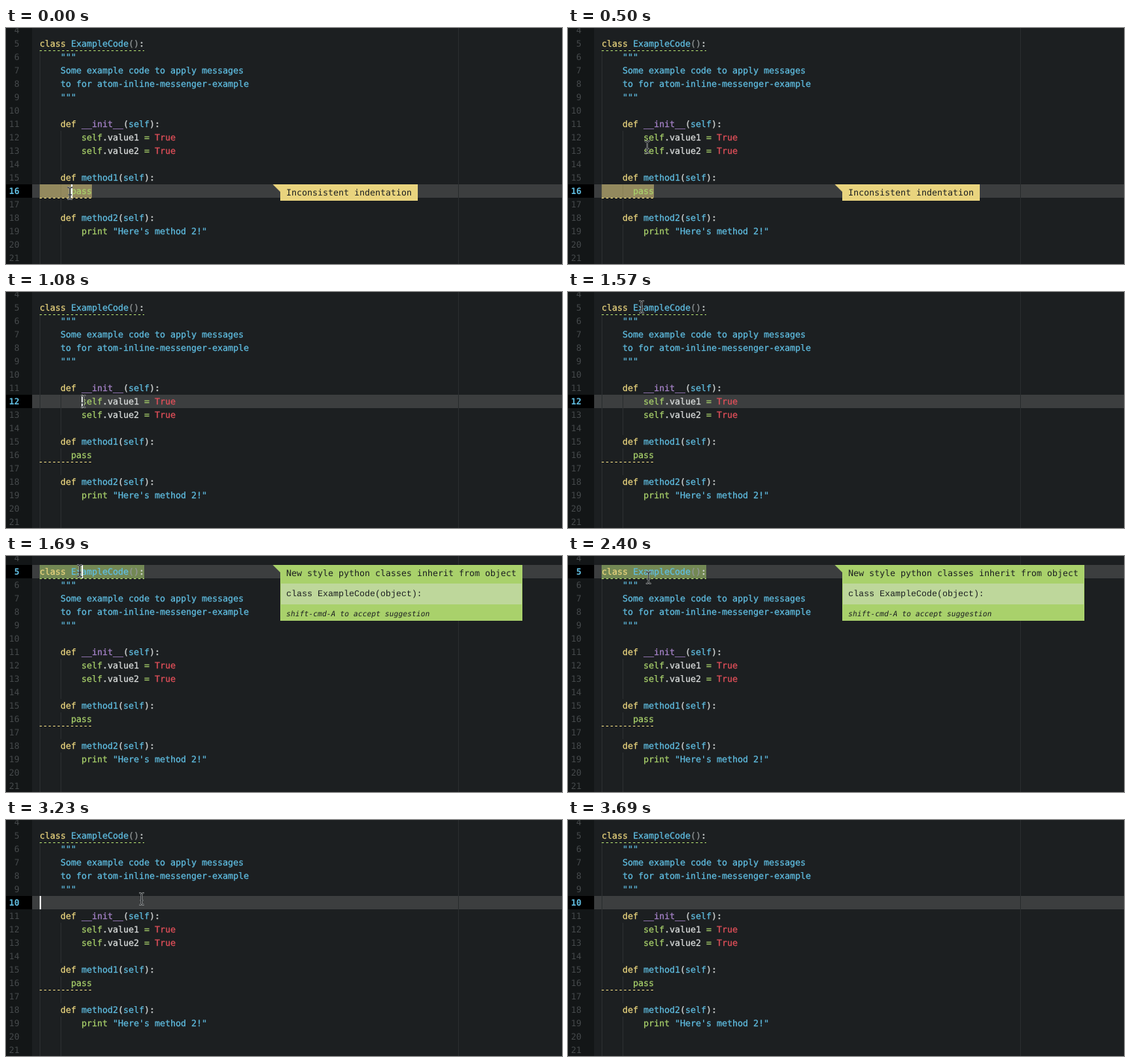
These frames come from a looping animation (744x317 px, 4250 ms). An HTML page:

```html
<!DOCTYPE html>
<html lang="en">
<head>
<meta charset="utf-8">
<title>Inline messages</title>
<style>
  html, body { margin: 0; width: 100%; height: 100%; overflow: hidden; background: #1c1f21; }
  svg { display: block; }
  text {
    font: 11.63px "DejaVu Sans Mono", monospace;
    white-space: pre;
    text-rendering: geometricPrecision;
  }
  .code { stroke-width: .25px; }
  .num { fill: #45494b; text-anchor: end; }
  .num.on { fill: #62c0e4; font-weight: bold; }
  .sample { font: 11.67px "Liberation Mono", monospace; }
  .hint { font: italic 9.97px "DejaVu Sans Mono", monospace; }
  .dash { stroke-dasharray: 3 3; }
</style>
</head>
<body>
<svg id="stage" width="744" height="317" viewBox="0 0 744 317"></svg>
<script>
const LOOP = 4250, LEFT = 45, CHAR = 7, LINE = 18;
const YELLOW = '#e9d47e', BLUE = '#60bfe3', GREEN = '#a9d16b', RED = '#e2505a',
      PURPLE = '#a884cb', WHITE = '#dcdfde', GREY = '#939899', INK = '#1c1f21';
const stage = document.getElementById('stage');
const rowTop = n => 12 + (n - 5) * LINE;

function add(tag, attrs, parent = stage, content = '') {
  const el = document.createElementNS('http://www.w3.org/2000/svg', tag);
  for (const key in attrs) el.setAttribute(key, attrs[key]);
  el.textContent = content;
  parent.append(el);
  return el;
}
const rect = (x, y, width, height, fill, parent) => add('rect', { x, y, width, height, fill }, parent);
const show = (el, on) => el.setAttribute('visibility', on ? 'visible' : 'hidden');

// Background, active row and guides
rect(0, 0, 744, 317, '#1c1f21');
rect(0, 0, 35, 317, '#131617');
const active = add('g', {});
rect(0, 0, 35, LINE, '#000', active);
rect(35, 0, 709, LINE, '#3c3e3f', active);
rect(605, 0, 1, 317, '#292c2e');
rect(LEFT, rowTop(6), 1, 300, '#2b2e30');
for (const n of [12, 13, 14, 16, 17, 19, 20, 21]) rect(73, rowTop(n), 1, LINE, '#2b2e30');

// Marked ranges
function mark(n, chars, color) {
  const y = rowTop(n), width = chars * CHAR;
  const fill = rect(LEFT, y, width, LINE, color);
  fill.setAttribute('fill-opacity', .5);
  add('path', { d: `M${LEFT} ${y + 18.5}h${width}`, stroke: color, class: 'dash' });
  return fill;
}
const classMark = mark(5, 20, GREEN);
const passMark = mark(16, 10, YELLOW);

// Code: line, column, then text and colour pairs
const code = [
  [5, 0, 'class ', YELLOW, 'ExampleCode', BLUE, '()', GREY, ':', WHITE],
  [6, 4, '"""', BLUE],
  [7, 4, 'Some example code to apply messages', BLUE],
  [8, 4, 'to for atom-inline-messenger-example', BLUE],
  [9, 4, '"""', BLUE],
  [11, 4, 'def ', YELLOW, '__init__', PURPLE, '(', WHITE, 'self', BLUE, '):', WHITE],
  [12, 8, 'self', GREEN, '.value1 ', WHITE, '= ', GREEN, 'True', RED],
  [13, 8, 'self', GREEN, '.value2 ', WHITE, '= ', GREEN, 'True', RED],
  [15, 4, 'def ', YELLOW, 'method1', BLUE, '(', WHITE, 'self', BLUE, '):', WHITE],
  [16, 6, 'pass', GREEN],
  [18, 4, 'def ', YELLOW, 'method2', BLUE, '(', WHITE, 'self', BLUE, '):', WHITE],
  [19, 8, 'print ', GREEN, '"Here\'s method 2!"', BLUE]
];
for (let [n, col, ...parts] of code) {
  for (let i = 0; i < parts.length; i += 2) {
    const fill = parts[i + 1];
    add('text', { x: LEFT + col * CHAR, y: rowTop(n) + 13, fill, stroke: fill, class: 'code' }, stage, parts[i]);
    col += parts[i].length;
  }
}
const numbers = [];
for (let n = 4; n <= 21; n++) numbers[n] = add('text', { x: 18, y: rowTop(n) + 13 }, stage, n);

// Message bubbles
function bubble(n, width, height, color) {
  const g = add('g', { transform: `translate(367 ${rowTop(n)})` });
  add('path', { d: `M-10 0H${width}V${height}H0V10z`, fill: color }, g);
  return g;
}
const label = (g, y, content, cls = '') => add('text', { x: 8, y, fill: INK, class: cls }, g, content);

const indentTip = bubble(16, 184, 22, YELLOW);
label(indentTip, 15, 'Inconsistent indentation');

const classTip = bubble(5, 324, 75, GREEN);
rect(1, 25, 322, 28, '#bed79b', classTip);
label(classTip, 15, 'New style python classes inherit from object');
label(classTip, 42, 'class ExampleCode(object):', 'sample');
label(classTip, 69, 'shift-cmd-A to accept suggestion', 'hint');

const caret = rect(0, 0, 2, LINE, '#f4f5f5');
const pointer = add('g', { fill: 'none' });
const beam = 'M-3.5-8Q0-8 0-5.5Q0-8 3.5-8M0-6V6M-3.5 8Q0 8 0 5.5Q0 8 3.5 8M-2.5 2H2.5';
add('path', { d: beam, stroke: '#a5a8a9', 'stroke-width': 2.2 }, pointer);
add('path', { d: beam, stroke: '#25282a', 'stroke-width': 1 }, pointer);

// Pointer moves: start, end, number of steps, waypoints
const moves = [
  [240, 740, 8, [[85.5, 222], [92, 194], [106, 160], [119, 135], [118, 141]]],
  [800, 1020, 5, [[118, 141], [111, 144], [103.5, 147]]],
  [1220, 1570, 7, [[103.5, 147], [104, 112], [101, 52], [98.5, 20]]],
  [2400, 2760, 6, [[98.5, 20], [117, 38], [161, 87], [181.5, 106]]],
  [3410, 3620, 4, [[181.5, 106], [205, 116], [310, 160], [510, 232], [726.5, 306]]]
];
function pointerAt(t) {
  let place = moves[0][3][0];
  for (const [start, end, steps, pts] of moves) {
    if (t < start) break;
    const step = Math.min(steps, 1 + Math.floor((t - start) / (end - start) * (steps - 1) + 1e-6));
    const u = step / steps * (pts.length - 1);
    const i = Math.min(Math.floor(u), pts.length - 2);
    place = pts[i].map((v, k) => v + (pts[i + 1][k] - v) * (u - i));
  }
  return place;
}

// Clicks: time, line, caret column
const clicks = [[0, 16, 6], [1080, 12, 8], [1690, 5, 8], [3230, 10, 0]];
const caretOn = [[0, 300], [660, 960], [1080, 1500], [1690, 2160], [2544, 3000], [3230, 3660]];

function draw(now) {
  const t = Math.max(0, now) % LOOP;
  const [, line, col] = clicks.filter(c => c[0] <= t).pop();
  active.setAttribute('transform', `translate(0 ${rowTop(line)})`);
  numbers.forEach((el, n) => el.setAttribute('class', n === line ? 'num on' : 'num'));
  for (const el of [classMark, classTip]) show(el, line === 5);
  for (const el of [passMark, indentTip]) show(el, line === 16);
  caret.setAttribute('x', LEFT + col * CHAR);
  caret.setAttribute('y', rowTop(line));
  show(caret, caretOn.some(([a, b]) => t >= a && t < b));
  pointer.setAttribute('transform', `translate(${pointerAt(t)})`);
  show(pointer, t < 3690);
  requestAnimationFrame(draw);
}
draw(performance.now());
</script>
</body>
</html>
```
